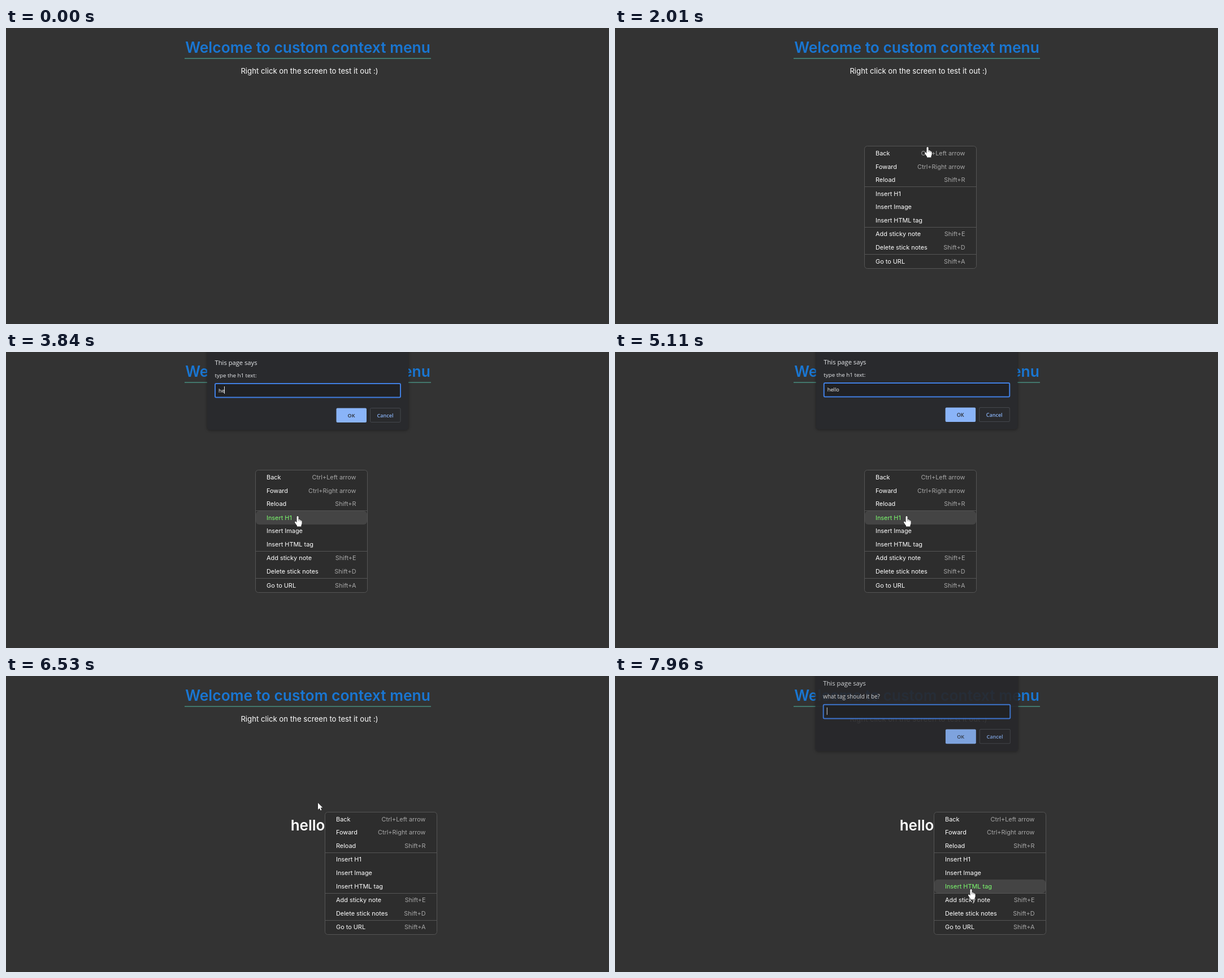
An HTML page with a canvas for the animation above (8000 ms loop, 1067 by 525 pixels).

```html
<!DOCTYPE html>
<html lang="en">
<head>
<meta charset="utf-8">
<title>Custom context menu</title>
<style>
  html, body { margin: 0; width: 100%; height: 100%; overflow: hidden; background: #333; }
  canvas { display: block; }
</style>
</head>
<body>
<canvas id="stage" width="1067" height="525"></canvas>
<script>
const ctx = document.getElementById('stage').getContext('2d');
const LOOP = 8000;
const PAGE_FONT = 'Inter, sans-serif';
const DIALOG_FONT = '"Open Sans", sans-serif';

const GROUPS = [
  [['Back', 'Ctrl+Left arrow'], ['Foward', 'Ctrl+Right arrow'], ['Reload', 'Shift+R']],
  [['Insert H1'], ['Insert Image'], ['Insert HTML tag']],
  [['Add sticky note', 'Shift+E'], ['Delete stick notes', 'Shift+D']],
  [['Go to URL', 'Shift+A']]
];
const ROWS = GROUPS.flatMap((group, g) => group.map(([label, keys], i) => ({ label, keys, g, first: i === 0 })));
const ROW_HEIGHT = 23.65;
const MENU = { width: 198, height: 217 };

const MENUS = [
  { x: 441, y: 209.7, open: 1410, close: 5200, clicked: 2880 },
  { x: 564, y: 241.5, open: 6530, close: LOOP, clicked: 7620 }
];
const DIALOGS = [
  { prompt: 'type the h1 text:', answer: 'hello', open: 2879, close: 5240 },
  { prompt: 'what tag should it be?', answer: '', open: 7876, close: LOOP + 1000 }
];
const TYPING = { start: 3640, interval: 165 };
const POINTER_ENTERS = 180;

// Each move is a Bezier curve that decelerates by the given power.
const MOVES = [
  { start: 310, end: 1010, power: 2, path: [[1042, 512], [760, 230], [441, 210]] },
  { start: 1340, end: 2010, power: 1.5, path: [[441, 210], [395, 157], [530, 157], [553, 211]] },
  { start: 2150, end: 2750, power: 1.5, path: [[553, 211], [530, 255], [516, 291]] },
  { start: 5710, end: 6200, power: 1, path: [[516, 291], [485, 235], [535, 186], [564, 241]] },
  { start: 6460, end: 6750, power: 1, path: [[564, 241], [520, 215], [600, 203], [648, 221]] },
  { start: 6750, end: 7420, power: 4, path: [[648, 221], [630, 378]] }
];

const ARROW = new Path2D('M0 0V12L2.8 9.4 4.6 13.6 6.5 12.8 4.7 8.6H8.4Z');
const HAND = new Path2D('M-1.5 1.5Q-1.5 0 0 0T1.5 1.5V6Q3.4 5.4 3.9 6.8 5.4 6.3 5.9 7.7 7.6 7.5 7.6 9.3V13' +
  'Q7.4 15 6.4 16.2V18.5H-1V17Q-3.4 14 -5 10.9 -5.4 9.2 -3.6 9.4L-1.5 11.3Z');
const KNUCKLES = new Path2D('M1.5 6V9M3.9 6.8V9.3M5.9 7.7V9.8');

const clamp = v => Math.max(0, Math.min(1, v));
const mix = (a, b, k) => a.map((v, i) => v + (b[i] - v) * k);

function bezier(points, k) {
  if (points.length === 1) return points[0];
  return bezier(points.slice(1).map((p, i) => mix(points[i], p, k)), k);
}

function pointerAt(t) {
  const move = MOVES.findLast(m => t >= m.start) || MOVES[0];
  const progress = clamp((t - move.start) / (move.end - move.start));
  return bezier(move.path, 1 - (1 - progress) ** move.power);
}

function text(str, x, y, color, font, align = 'left') {
  ctx.font = font;
  ctx.textAlign = align;
  ctx.fillStyle = color;
  ctx.fillText(str, x, y);
}

function box(x, y, w, h, radius, fill, stroke, line = 1) {
  ctx.beginPath();
  ctx.roundRect(x, y, w, h, radius);
  if (fill) { ctx.fillStyle = fill; ctx.fill(); }
  if (stroke) { ctx.strokeStyle = stroke; ctx.lineWidth = line; ctx.stroke(); }
}

function drawPage(t) {
  ctx.fillStyle = '#333';
  ctx.fillRect(0, 0, 1067, 525);
  text('Welcome to custom context menu', 534, 44, '#1976d2', `600 26.4px ${PAGE_FONT}`, 'center');
  ctx.fillStyle = '#52b9a6';
  ctx.fillRect(316, 53.5, 436, 1);
  text('Right click on the screen to test it out :)', 537, 81, '#fff', `13.2px ${PAGE_FONT}`, 'center');
  if (t >= MENUS[0].close) text('hello', 534, 273.5, '#fff', `600 26px ${PAGE_FONT}`, 'center');
}

const rowCenter = (menu, i) => menu.y + 12.2 + ROW_HEIGHT * i + 0.8 * ROWS[i].g;

const isInside = (menu, [x, y]) =>
  x >= menu.x && x <= menu.x + MENU.width && y >= menu.y && y <= menu.y + MENU.height;

function drawMenu(menu, t) {
  const left = menu.x + 0.5, top = Math.floor(menu.y) + 0.5;
  const hover = pointerAt(t - 90); // the highlight trails the pointer
  const font = `10.9px ${PAGE_FONT}`;
  box(left, top, MENU.width, MENU.height, 5, '#2d2d2d');
  ROWS.forEach((row, i) => {
    const y = rowCenter(menu, i);
    const hovered = isInside(menu, hover) && Math.abs(hover[1] - y) <= ROW_HEIGHT / 2;
    if (hovered) box(left + 0.5, Math.round(y - 12), MENU.width - 1, 24, 6, '#444');
    text(row.label, menu.x + 20, y + 4, hovered && t >= menu.clicked ? '#7cfc6e' : '#fff', font);
    if (row.keys) text(row.keys, menu.x + 178.5, y + 4, '#a6a6a6', font, 'right');
  });
  ctx.fillStyle = '#555';
  ROWS.forEach((row, i) => {
    if (row.g && row.first) ctx.fillRect(left, Math.floor(menu.y + i * 24), MENU.width, 1);
  });
  box(left, top, MENU.width, MENU.height, 5, null, '#555');
}

function drawDialog(dialog, t) {
  const shown = clamp(Math.min(t - dialog.open, dialog.close - t) / 140);
  if (!shown) return;
  const scale = 1 + 0.02 * (1 - shown);

  ctx.save();
  ctx.globalAlpha = Math.min(1, shown * 1.45);
  ctx.translate(534, -14.5 * (1 - shown));
  ctx.scale(scale, scale);
  ctx.translate(-534, 0);

  ctx.shadowColor = 'rgba(0,0,0,.4)';
  ctx.shadowBlur = 5;
  ctx.shadowOffsetY = 1;
  box(356, -20, 356, 158, 5, '#292a2d');
  ctx.shadowColor = 'transparent';

  text('This page says', 369.5, 23, '#e8eaed', `11.2px ${DIALOG_FONT}`);
  text(dialog.prompt, 369.5, 45, '#e8eaed', `9.8px ${DIALOG_FONT}`);
  box(370, 56, 328, 24.5, 2, '#202124', '#417fe2', 2);

  const keyPresses = Math.floor((t - TYPING.start) / TYPING.interval) + 1;
  const value = dialog.answer.slice(0, Math.max(0, keyPresses));
  text(value, 376, 71.5, '#fff', `9.2px ${DIALOG_FONT}`);
  const blinkStart = value ? TYPING.start + (value.length - 1) * TYPING.interval : dialog.open;
  if ((t - blinkStart) % 1080 < 540) {
    ctx.fillStyle = '#e8eaed';
    ctx.fillRect(Math.floor(376 + ctx.measureText(value).width), 61, 1, 13);
  }

  box(584.5, 99.5, 53.5, 25.5, 2, '#8ab4f8');
  text('OK', 611, 115.5, '#292a2d', `600 9px ${DIALOG_FONT}`, 'center');
  box(644.5, 99.5, 53.5, 25, 2, null, '#45484d');
  text('Cancel', 671, 115.5, '#8ab4f8', `600 9px ${DIALOG_FONT}`, 'center');
  ctx.restore();
}

function drawPointer(t, menu) {
  const at = pointerAt(t);
  const hand = menu && isInside(menu, at);
  ctx.save();
  ctx.translate(...at.map(Math.round));
  ctx.lineJoin = 'round';
  ctx.lineWidth = 1;
  ctx.strokeStyle = '#1a1a1a';
  ctx.fillStyle = '#fff';
  const shape = hand ? HAND : ARROW;
  ctx.stroke(shape);
  ctx.fill(shape);
  if (hand) {
    ctx.lineWidth = 0.5;
    ctx.stroke(KNUCKLES);
  }
  ctx.restore();
}

function frame() {
  const t = performance.now() % LOOP;
  const menu = MENUS.find(m => t >= m.open && t < m.close);
  drawPage(t);
  if (menu) drawMenu(menu, t);
  DIALOGS.forEach(dialog => drawDialog(dialog, t));
  if (t >= POINTER_ENTERS) drawPointer(t, menu);
  requestAnimationFrame(frame);
}
frame();
</script>
</body>
</html>
```
